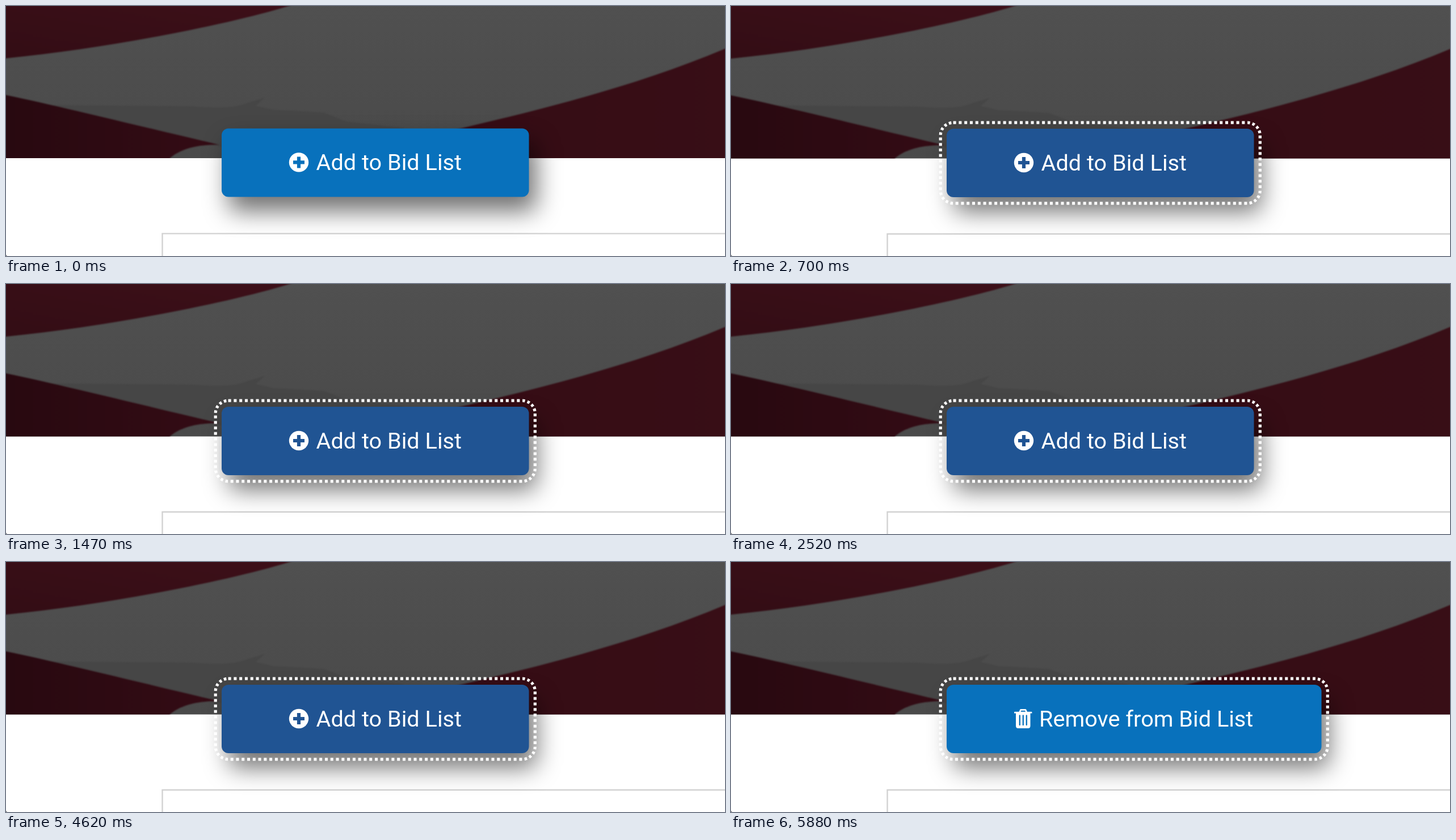
Write an HTML page that moves like this. It is 1267 px wide and 442 px high and loops after 5.95 s.

```html
<!DOCTYPE html>
<html lang="en">
<head>
<meta charset="utf-8">
<title>Bid list button</title>
<style>
  html, body { margin: 0; width: 100%; height: 100%; overflow: hidden; background: #fff; }
  svg { display: block; width: 100vw; height: 100vh; }
  text { font: 39.65px Roboto, sans-serif; fill: #fff; }
  filter { color-interpolation-filters: sRGB; }
</style>
</head>
<body>
<svg viewBox="0 0 1267 442" preserveAspectRatio="none">
  <defs>
    <linearGradient id="cloth" x2="0" y2="1">
      <stop offset="0" stop-color="#505050"/>
      <stop offset="1" stop-color="#4a4a4a"/>
    </linearGradient>
    <linearGradient id="redTop" x1="0" y1="1" x2="1" y2="0">
      <stop offset="0" stop-color="#330d15"/>
      <stop offset="1" stop-color="#3e1019"/>
    </linearGradient>
    <linearGradient id="redLeft" x2="1" y2="0">
      <stop offset="0" stop-color="#280910"/>
      <stop offset="1" stop-color="#340c15"/>
    </linearGradient>
    <linearGradient id="redRight" x2="1" y2="0">
      <stop offset="0" stop-color="#350c15"/>
      <stop offset="1" stop-color="#380e16"/>
    </linearGradient>
    <filter id="soft" x="-5%" y="-5%" width="110%" height="110%"><feGaussianBlur stdDeviation="1.2"/></filter>
    <filter id="shade" filterUnits="userSpaceOnUse" x="280" y="130" width="900" height="330">
      <feGaussianBlur stdDeviation="21.5"/>
    </filter>
    <clipPath id="hero"><path d="M0 -5H1267V269.5H0Z"/></clipPath>
    <clipPath id="inside"><path id="rim"/></clipPath>
  </defs>

  <g id="page">
    <g clip-path="url(#hero)">
      <path fill="url(#cloth)" d="M0 -5H1267V270H0Z"/>
      <path fill="#464646" filter="url(#soft)" d="M85 176L330 178Q400 184 425 172L455 163L440 177L470 184L560 189L600 205L700 216V250H380L250 216Z"/>
      <g filter="url(#soft)">
        <path fill="url(#redTop)" d="M-9 -9H530L500 0C390 34 180 75 0 93H-9Z"/>
        <path fill="url(#redLeft)" d="M-9 156L0 158C110 181 260 219 376 246Q318 245 289 269V280H-9Z"/>
        <path fill="url(#redRight)" d="M1280 71L1267 76C1120 138 960 180 805 216L700 240V280H1280Z"/>
      </g>
    </g>
    <path d="M275.5 450V403H1275" fill="none" stroke="#d2d2d2" stroke-width="2.4"/>

    <rect id="shadow" rx="12" fill="#000" fill-opacity=".56" filter="url(#shade)"/>
    <rect id="face" rx="12"/>
    <path id="ring" fill="none" stroke="#fff" stroke-width="10.4" clip-path="url(#inside)"/>

    <g id="plus">
      <circle cx="516" cy="277" r="17.2" fill="#fff"/>
      <path id="cross" d="M506 277H526M516 267V287" stroke-width="6.2"/>
    </g>
    <g id="spin" fill="none" stroke-width="8">
      <circle cx="517" cy="278" r="14.5" stroke="#fff" stroke-opacity=".27"/>
      <path id="arc" stroke="#fff" d="M506.75 288.25A14.5 14.5 0 0 1 506.75 267.75"/>
    </g>
    <g id="trash">
      <path fill="none" stroke="#fff" stroke-width="2.7" stroke-linejoin="round" d="M508.5 266L510.5 261.4H519L521 266"/>
      <path fill="#fff" d="M500 264.8H529.5Q530.4 264.8 530.4 265.8V267.6H499V265.8Q499 264.8 500 264.8ZM502 267H527.5V289.5Q527.5 294 523.5 294H506Q502 294 502 289.5Z"/>
      <path id="slots" d="M508.8 271.5V288M514.8 271.5V288M520.8 271.5V288" stroke-width="2.3" stroke-linecap="round"/>
    </g>
    <text id="label" y="290.6"></text>
  </g>
  <path d="M0 439.5L2 442H0Z" fill="#777"/>
</svg>
<script>
const LOOP = 5950, TICK = 70;
const at = { hover: 140, focus: 630, load: 840, loaded: 1470, remove: 5250, leave: 5460 };
const BLUE = '#0871bc', NAVY = '#205493';
const $ = id => document.getElementById(id);

function set(id, attrs) {
  for (const key in attrs) $(id).setAttribute(key, attrs[key]);
}

function show(id, on) {
  $(id).style.display = on ? '' : 'none';
}

// Dashes follow the outer edge clockwise; the clip keeps their inner half.
function drawRing(x, y, w, h, r) {
  const arc = (dx, dy) => `a${r} ${r} 0 0 1 ${dx} ${dy}`;
  const d = `M${x + r} ${y}h${w - 2 * r}${arc(r, r)}v${h - 2 * r}${arc(-r, r)}` +
    `h${2 * r - w}${arc(-r, -r)}v${2 * r - h}${arc(r, -r)}z`;
  const length = 2 * (w + h) - 8 * r + 2 * Math.PI * r;
  const period = length / Math.round(length / 9.75);
  set('rim', { d });
  set('ring', { d, 'stroke-dasharray': `5 ${period - 5}` });
}

function render(ms) {
  const t = Math.floor(ms / TICK) * TICK;
  const loading = t >= at.load && t < at.loaded;
  const removing = t >= at.remove;
  const hovered = t >= at.hover && t < at.leave && !loading;
  const color = hovered ? NAVY : BLUE;

  const top = loading ? 214 : 217;
  const width = removing ? 660.5 : loading ? 544.3 : 541.5;
  const height = 338 - top;

  set('page', { transform: `translate(0 ${t < at.hover ? -0.6 : 0})` });
  set('face', { x: 380, y: top, width, height, fill: color });
  set('shadow', { x: 392.5, y: top + 25, width, height });
  show('ring', t >= at.focus);
  drawRing(366.6, top - 13.4, width + 26.8, height + 26.8, 25);

  show('plus', !loading && !removing);
  show('spin', loading);
  show('trash', removing);
  set('cross', { stroke: color });
  set('slots', { stroke: color });
  set('arc', { transform: `rotate(${(t - 873) / 1100 * 360} 517 278)` });

  set('label', { x: removing ? 543 : loading ? 549.6 : 546.6 });
  $('label').textContent = removing ? 'Remove from Bid List' : 'Add to Bid List';
}

const start = performance.now();
function frame() {
  render((performance.now() - start) % LOOP);
  requestAnimationFrame(frame);
}
frame();
</script>
</body>
</html>
```
